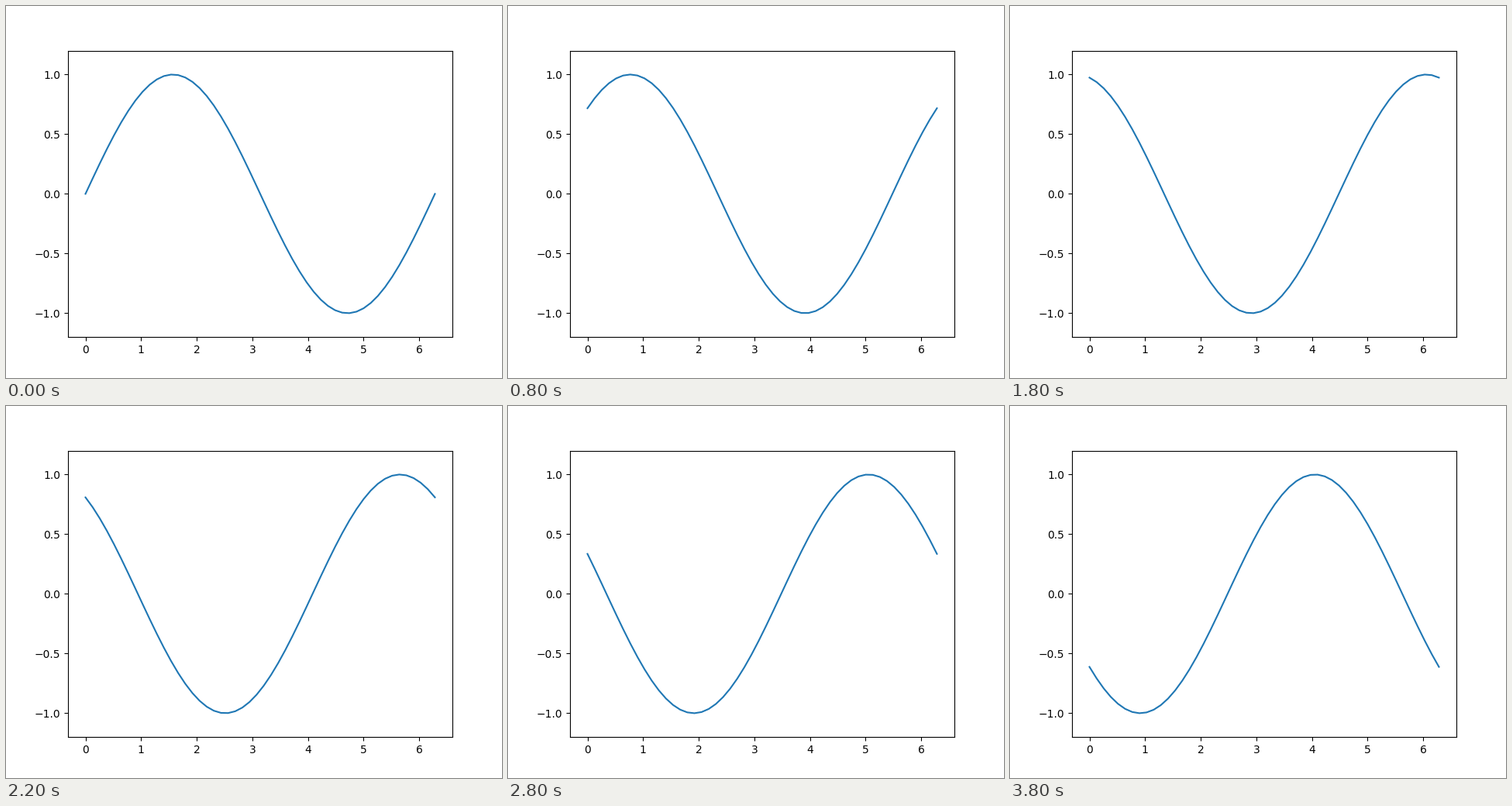
Animation of 640x480 px, one loop 4000 ms. Source, as a matplotlib script:

```python
import numpy as np
import matplotlib.pyplot as plt
from matplotlib.animation import FuncAnimation

FRAMES = 20
INTERVAL = 200  # ms
PHASE_STEP = 0.2  # radians per frame

fig, ax = plt.subplots(figsize=(6.4, 4.8), dpi=100)
x = np.linspace(0, 2 * np.pi, 50)
line, = ax.plot(x, np.sin(x))
ax.set_ylim(-1.2, 1.2)


def update(frame):
    line.set_ydata(np.sin(x + PHASE_STEP * frame))
    return line,


anim = FuncAnimation(fig, update, frames=FRAMES, interval=INTERVAL,
                     repeat=True, repeat_delay=0)
plt.show()
```
